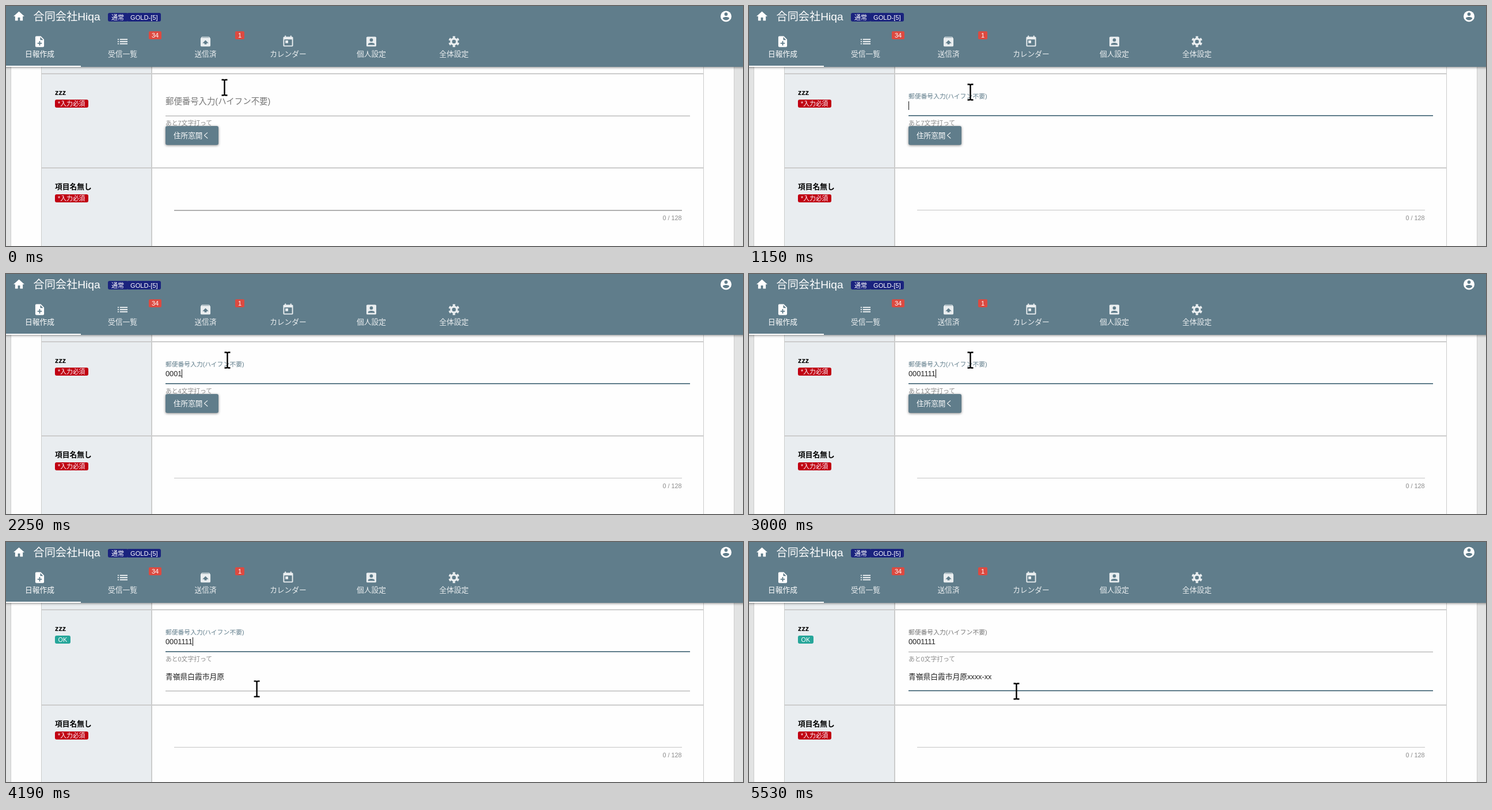
Write an HTML page that moves like this. It is 1280 by 418 pixels and loops after 8530 ms.

```html
<!DOCTYPE html>
<html lang="ja">
<meta charset="utf-8">
<style>
html, body { margin: 0; width: 100%; height: 100%; overflow: hidden; background: #e2e3e3; }
svg { display: block; font-family: "Liberation Sans", "Noto Sans CJK JP", "Noto Sans CJK", sans-serif; white-space: pre; }
.small { font-size: 10.8px; }
.body { font-size: 12.75px; }
.bold { font-weight: bold; }
.mid { text-anchor: middle; }
.bar { filter: drop-shadow(0 1px 2px #0007); }
.grey { fill: #8c8c8c; }
</style>
<svg width="1280" height="418" viewBox="0 0 1280 418">
  <rect x="8" width="1257" height="418" fill="#ccc"/>
  <rect x="9" width="1255" height="418" fill="#fefefe"/>
  <rect x="62" y="100" width="191" height="318" fill="#e9edf0"/>
  <g fill="#ccc">
    <rect x="61" y="100" width="1" height="318"/>
    <rect x="1211" y="100" width="1" height="318"/>
    <rect x="252" y="100" width="2" height="318"/>
    <rect x="61" y="117" width="1151" height="2"/>
  </g>

  <text class="body bold" x="85" y="155">zzz</text>
  <g id="need">
    <rect x="85" y="163" width="58" height="14" rx="3" fill="#c00012"/>
    <text class="small" x="90" y="174" fill="#fff">*入力必須</text>
  </g>
  <g id="ok">
    <rect x="85" y="163" width="27" height="14" rx="3" fill="#26a69a"/>
    <text class="small" x="90.5" y="174" fill="#fff">OK</text>
  </g>

  <g id="below">
    <rect x="61" y="281" width="1151" height="2" fill="#ccc"/>
    <text class="body bold" x="85" y="319">項目名無し</text>
    <rect x="85" y="328" width="58" height="14" rx="3" fill="#c00012"/>
    <text class="small" x="90" y="339" fill="#fff">*入力必須</text>
    <rect id="memoLine" x="292" y="355" width="882" height="1"/>
    <text class="small grey" x="1173.5" y="373" text-anchor="end">0 / 128</text>
  </g>

  <text id="label" font-size="14.4">郵便番号入力(ハイフン不要)</text>
  <text id="zip" class="body" x="277" y="177.6" fill="#222"></text>
  <rect id="zipBase" x="277" y="191" width="911" height="1"/>
  <rect id="zipFocus" y="190" height="2" fill="#607d8b"/>
  <text id="oldHint" class="small grey" x="277"></text>
  <text id="hint" class="small grey" x="277"></text>

  <g id="button">
    <rect class="bar" x="277" y="209" width="92" height="33" rx="3" fill="#607d8b"/>
    <text x="291" y="230" font-size="12.6" font-weight="500" fill="#fff">住所窓開く</text>
  </g>
  <g id="place">
    <text id="address" class="body" x="277" y="239" fill="#222"></text>
    <rect id="addrBase" x="277" y="259" width="911" height="1"/>
    <rect id="addrFocus" y="258" height="2" fill="#607d8b"/>
  </g>
  <rect id="caret" width="1" height="15" fill="#111"/>

  <rect class="bar" x="-9" y="-9" width="1298" height="115" fill="#607d8b"/>
  <rect y="104" width="130" height="2" fill="#fff"/>
  <g id="head" fill="#fff">
    <text x="47.5" y="24.5" font-size="19.2">合同会社Hiqa</text>
    <rect x="177" y="12" width="35" height="15" rx="3" fill="#1a237e"/>
    <rect x="210" y="12" width="59" height="15" rx="3" fill="#1a237e"/>
    <text x="183" y="24" font-size="11.1" font-weight="500">通常</text>
    <text x="216" y="24" font-size="11.1">GOLD-[5]</text>
    <rect x="248" y="44" width="22" height="14" rx="2" fill="#dc4a41"/>
    <rect x="398" y="44" width="16" height="14" rx="2" fill="#dc4a41"/>
    <text class="mid" x="259" y="55" font-size="11">34</text>
    <text class="mid" x="406" y="55" font-size="11">1</text>
  </g>

  <path id="pointer" d="M-5-13.5h3Q0-13.5 0-11.5Q0-13.5 2-13.5h3M0-12V12M-5 13.5h3Q0 13.5 0 11.5Q0 13.5 2 13.5h3" fill="none" stroke="#000" stroke-width="2.4"/>
</svg>
<script>
const $ = id => document.getElementById(id);
const LOOP = 8530, BLUE = '#607d8b';
const ZIP = '0001111', PLACE = '青嶺県白霞市月原', EXTRA = 'xxxx-xx';
const FOCUS = 800, LOOKUP = 3240, SWITCH = 4534;
const zipKeys = [1230, 1500, 1770, 2240, 2480, 2760, 3000];
const hintTimes = [1310, 1540, 2000, 2390, 2530, 2760, 3160];
const extraKeys = [...EXTRA].map((_, i) => 4930 + 75 * i);
// time, x, y of the pointer
const route = [[80, 381, 138], [320, 381, 138], [530, 384.5, 150], [3740, 384.5, 150],
  [3960, 392, 165], [4040, 392, 165], [4270, 452, 290], [4480, 464.5, 260]];

const icons = [
  [22.5, 18, '<path d="M10 20v-6h4v6h5v-8h3L12 3 2 12h3v8z"/>'],
  [1250.5, 18, `<circle cx="12" cy="12" r="10"/><g fill="${BLUE}"><circle cx="12" cy="8" r="3"/><path d="M6 16c0-4 12-4 12 0c-3 4.3-9 4.3-12 0z"/></g>`],
  [58.5, 62, '<path fill-rule="evenodd" d="M6 2h8l6 6v12q0 2-2 2H6q-2 0-2-2V4q0-2 2-2zM13 3.5V9h5.500zM11 11v3H8v2h3v3h2v-3h3v-2h-3v-3z"/>', '日報作成'],
  [202.5, 62, '<path d="M3 7h2v2H3zM3 11h2v2H3zM3 15h2v2H3zM7 7h14v2H7zM7 11h14v2H7zM7 15h14v2H7z"/>', '受信一覧'],
  [346.5, 62, '<path fill-rule="evenodd" d="M6 3h12l1.200.500L21 6.500V19q0 2-2 2H5q-2 0-2-2V6.500L4.800 3.500zM5.100 5h13.800l-.900-1H6zM12 9.500L6.500 15H10v2h4v-2h3.500z"/>', '送信済'],
  [490, 62, '<path fill-rule="evenodd" d="M6 1h2v2h8V1h2v2h1q2 0 2 2v14q0 2-2 2H5q-2 0-2-2V5q0-2 2-2h1zM5 8v11h14V8zM7 10h5v5H7z"/>', 'カレンダー'],
  [634.5, 62, `<rect x="3" y="3" width="18" height="18" rx="2"/><g fill="${BLUE}"><circle cx="12" cy="9" r="3"/><path d="M6 18v-1c0-4 12-4 12 0v1z"/></g>`, '個人設定'],
  [778, 62, '<g fill="none" stroke="#fff"><circle cx="12" cy="12" r="5.3" stroke-width="3.6"/><circle cx="12" cy="12" r="8.3" stroke-width="3.4" pathLength="12" stroke-dasharray="1" stroke-dashoffset="-.5"/></g>', '全体設定'],
];
$('head').insertAdjacentHTML('beforeend', icons.map(([x, y, art, name], i) =>
  `<g opacity="${i < 3 ? 1 : .87}"><g transform="translate(${x} ${y}) scale(.95) translate(-12 -12)">${art}</g>` +
  (name ? `<text class="mid" font-size="12.75" x="${x}" y="88.4" font-weight="${i < 3 ? 500 : 400}">${name}</text>` : '') +
  '</g>').join(''));

const clamp = v => Math.min(1, Math.max(0, v));
const mix = (a, b, p) => a + (b - a) * p;
const count = (times, t) => times.filter(k => k <= t).length;
const show = (id, on) => $(id).setAttribute('visibility', on ? 'visible' : 'hidden');
const set = (id, attrs) => { for (const k in attrs) $(id).setAttribute(k, attrs[k]); };

// cubic-bezier(.25, .8, .5, 1)
function ease(p) {
  let lo = 0, hi = 1, u;
  for (let i = 0; i < 24; i++) {
    u = (lo + hi) / 2;
    const x = .75 * u * (1 - u) ** 2 + 1.5 * u * u * (1 - u) + u ** 3;
    if (x < p) lo = u; else hi = u;
  }
  return 2.4 * u * (1 - u) ** 2 + 3 * u * u * (1 - u) + u ** 3;
}
const since = (t, start, span = 300) => {
  const p = clamp((t - start) / span);
  return p === 0 || p === 1 ? p : ease(p);
};

function pointerAt(t) {
  if (t < 80) return [379.5, 142];
  const i = count(route.map(r => r[0]), t) - 1, a = route[i], b = route[i + 1] || a;
  const p = clamp((t - a[0]) / (b[0] - a[0] || 1)), s = p * p * (3 - 2 * p);
  return [mix(a[1], b[1], s), mix(a[2], b[2], s)];
}

const baseLine = (id, hover) => set(id, { fill: `rgba(0,0,0,${mix(.36, .87, hover)})` });
const focusLine = (id, p) => set(id, { x: 732.5 - 455.5 * p, width: 911 * p });

function drawHint(t) {
  const n = count(hintTimes, t), p = n ? since(t, hintTimes[n - 1], 160) : 1;
  const put = (id, left, p) => {
    $(id).textContent = `あと${left}文字打って`;
    set(id, { y: 208 - 10 * (1 - p), opacity: p });
  };
  put('hint', 7 - n, p);
  put('oldHint', 8 - n, n ? 1 - p : 0);
}

function drawCaret(t) {
  const second = t >= SWITCH;
  const field = $(second ? 'address' : 'zip');
  const last = zipKeys.filter(k => k <= t).pop() || FOCUS;
  const on = second ? t < 5525 : t >= FOCUS && (t - last) % 1000 < 500;
  show('caret', on);
  set('caret', { x: Math.round(277 + field.getComputedTextLength()), y: second ? 227 : 166 });
}

function draw(t) {
  const found = t >= LOOKUP, focused = t >= FOCUS && t < SWITCH;
  const lift = since(t, FOCUS), move = since(t, SWITCH);

  set('label', {
    transform: `translate(277 ${mix(171, 160.6, lift)}) scale(${mix(1, .75, lift)})`,
    fill: focused ? BLUE : '#757575'
  });
  $('zip').textContent = ZIP.slice(0, count(zipKeys, t));
  $('address').textContent = PLACE + EXTRA.slice(0, count(extraKeys, t));
  drawHint(t);

  baseLine('zipBase', since(t, 320) - since(t, 4060));
  focusLine('zipFocus', lift - move);
  baseLine('addrBase', since(t, 4290));
  focusLine('addrFocus', move);
  set('memoLine', t < 80 ? { height: 2, fill: '#b0b0b0' } : { height: 1, fill: '#c4c4c4' });

  show('need', !found);
  show('button', !found);
  show('ok', found);
  show('place', found);
  set('below', { transform: `translate(0 ${found ? 2 : 0})` });

  drawCaret(t);
  set('pointer', { transform: `translate(${pointerAt(t)})` });
}

function tick() {
  draw(performance.now() % LOOP);
  requestAnimationFrame(tick);
}
tick();
</script>
</html>
```
